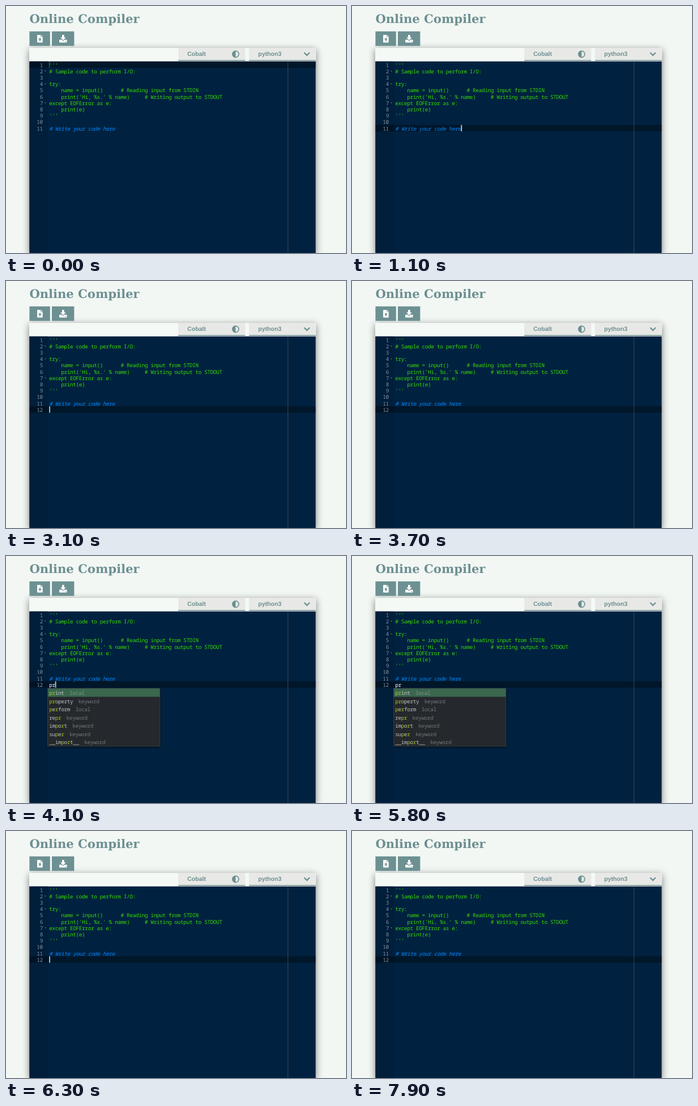
Recreate the animation shown at these times as an HTML page. Size 600x436 px, loop 8000 ms.

```html
<!DOCTYPE html>
<html lang="en">
<head>
<meta charset="utf-8">
<title>Online Compiler</title>
<style>
  html, body { margin: 0; width: 100%; height: 100%; overflow: hidden; background: #f2f7f4; }
  .stage { position: relative; width: 100%; height: 100%; overflow: hidden; contain: strict; }
  .card {
    position: absolute; left: 41px; top: 74px; right: 53px; bottom: 0;
    background: #f4f9f6; box-shadow: 0 3px 12px rgba(0, 0, 0, .48);
  }
  svg { position: absolute; left: 0; top: 0; display: block; width: 100%; height: 100%; overflow: hidden; }
  text { text-rendering: geometricPrecision; white-space: pre; }
  .title { font: bold 21.07px "DejaVu Serif", serif; fill: #6d8f91; }
  .option { font: bold 10.56px "Liberation Sans", sans-serif; fill: #6d8f91; }
  .mono text { font: 9.4px "Noto Sans Mono", monospace; letter-spacing: -.36px; }
  .string { fill: #3ad900; }
  .mono .comment { fill: #08f; font-style: italic; }
  .number { fill: #8091a0; text-anchor: end; }
  .plain { fill: #fff; }
  .item, .meta { fill: #c1c1c1; }
  .meta { fill-opacity: .5; }
  .hit { fill: #9ccd14; }
  .popup { filter: drop-shadow(1.5px 2px 1.7px rgba(0, 0, 0, .5)); }

  .timed { animation: 8s step-end infinite; }
  #active { animation-name: active; }
  #idle { animation-name: idle; }
  #caret { animation-name: move; }
  #blink { animation-name: blink; }
  #line12 { animation-name: line12; }
  #typedP { animation-name: typed-p; }
  #typedR { animation-name: typed-r; }
  #popupPr { animation-name: popup-pr; }
  #popupP { animation-name: popup-p; }

  @keyframes active {
    0% { transform: translateY(0); }
    13.75% { transform: translateY(112.2px); }
    38.75%, 100% { transform: translateY(123.42px); }
  }
  @keyframes idle { 0% { opacity: 1; } 13.75%, 100% { opacity: 0; } }
  @keyframes move {
    0% { transform: translate(116.16px, 112.2px); }
    38.75% { transform: translate(0, 123.42px); }
    51.25% { transform: translate(10.56px, 123.42px); }
    75% { transform: translate(5.28px, 123.42px); }
    78.75%, 100% { transform: translate(0, 123.42px); }
  }
  @keyframes blink {
    0%, 21.25%, 33.75%, 46.25%, 60%, 72.5%, 86.25%, 98.75%, 100% { opacity: 0; }
    13.75%, 26.25%, 38.75%, 51.25%, 65%, 75%, 78.75%, 91.25% { opacity: 1; }
  }
  @keyframes line12 { 0% { opacity: 0; } 38.75%, 100% { opacity: 1; } }
  @keyframes typed-p { 0%, 78.75%, 100% { opacity: 0; } 51.25% { opacity: 1; } }
  @keyframes typed-r { 0%, 75%, 100% { opacity: 0; } 51.25% { opacity: 1; } }
  @keyframes popup-pr { 0%, 76.25%, 100% { opacity: 0; } 51.25% { opacity: 1; } }
  @keyframes popup-p { 0%, 78.75%, 100% { opacity: 0; } 76.25% { opacity: 1; } }
</style>
</head>
<body>
<div class="stage">
<div class="card"></div>
<svg viewBox="0 0 600 436">
  <text class="title" x="41.4" y="29.8">Online Compiler</text>

  <g fill="#6d9092">
    <rect x="41.4" y="44.8" width="36.3" height="25.7"/>
    <rect x="81" y="44.8" width="39.3" height="25.7"/>
  </g>
  <g fill="#fff">
    <path d="M55 51.9q0-.9.9-.9H60.9V54.5H64.7V63.7q0 .8-.9.8H55.9q-.9 0-.9-.8zM61.7 51L64.7 53.8H61.7z"/>
    <path d="M99 51h3.6v4.6h3L100.8 60.4 96 55.6h3z"/>
    <path d="M94 60.3q0-.8.8-.8h3.4l2.6 2.3 2.6-2.3h3.4q.8 0 .8.8v3.3q0 .8-.8.8H94.8q-.8 0-.8-.8z"/>
  </g>
  <path fill="#6d9092" d="M59.9 56l3 3.2h-2.1v2.9h-1.8v-2.9h-2.1zM103.8 62.2h1v1h-1zM105.5 62.2h1v1h-1z"/>

  <g fill="#e8e9e6">
    <rect x="304" y="74" width="118.2" height="23"/>
    <rect x="428.8" y="74" width="117.8" height="23"/>
  </g>
  <path stroke="#6d9092" stroke-width="1.5" d="M304 96.2H422.2M428.8 96.2H546.6"/>
  <text class="option" x="320" y="88.2">Cobalt</text>
  <text class="option" x="445" y="88.2">python3</text>
  <circle cx="405.2" cy="85" r="5.6" fill="none" stroke="#6d8f91" stroke-width="1.6"/>
  <path fill="#6d8f91" d="M405.2 79.4a5.6 5.6 0 0 0 0 11.2z"/>
  <path fill="none" stroke="#6d8f91" stroke-width="2.3" d="M526.2 82.2l4.8 4.8 4.8-4.8"/>

  <rect x="41.4" y="97.8" width="505.2" height="339" fill="#002240"/>
  <rect x="41.4" y="97.8" width="32.6" height="339" fill="#011e3a"/>
  <rect id="active" class="timed" x="41.4" y="97.8" width="505.2" height="11.2" fill="#000" fill-opacity=".35"/>
  <path stroke="#555" stroke-width=".8" d="M497.6 97.8V436"/>

  <g id="code" class="mono"></g>
  <rect id="idle" class="timed" x="76.2" y="97.8" width="1" height="11.2" fill="#35933f"/>
  <g id="caret" class="timed">
    <rect id="blink" class="timed" x="76.3" y="97.8" width="1.4" height="11.2" fill="#fff"/>
  </g>
  <g id="popupPr" class="timed mono popup"></g>
  <g id="popupP" class="timed mono popup"></g>
</svg>
</div>
<script>
  const CHAR = 5.28, LINE = 11.22, ROW = 14.52, LEFT = 76.2, TOP = 97.8;
  const get = id => document.getElementById(id);

  function add(parent, tag, attrs, content = '') {
    const node = document.createElementNS('http://www.w3.org/2000/svg', tag);
    for (const key in attrs) node.setAttribute(key, attrs[key]);
    node.textContent = content;
    return parent.appendChild(node);
  }

  const lines = [
    "'''",
    '# Sample code to perform I/O:',
    '',
    'try:',
    '    name = input()      # Reading input from STDIN',
    "    print('Hi, %s.' % name)     # Writing output to STDOUT",
    'except EOFError as e:',
    '    print(e)',
    "'''",
    '',
    '# Write your code here',
    ''
  ];
  const baseline = i => TOP + i * LINE + 9.7;

  lines.forEach((line, i) => {
    const y = baseline(i), last = i === 11;
    const number = add(get('code'), 'text', { class: 'number' + (last ? ' timed' : ''), x: 64.9, y }, i + 1);
    if (last) number.id = 'line12';
    if (line) add(get('code'), 'text', { class: i === 10 ? 'comment' : 'string', x: LEFT, y }, line);
    if ([1, 3, 6].includes(i)) {
      add(get('code'), 'path', { d: `M67.8 ${y - 4.5}h3.2l-1.6 1.8z`, fill: '#5d7285' });
    }
  });
  add(get('code'), 'text', { id: 'typedP', class: 'plain timed', x: LEFT, y: baseline(11) }, 'p');
  add(get('code'), 'text', { id: 'typedR', class: 'plain timed', x: LEFT + CHAR, y: baseline(11) }, 'r');

  // Each letter of the query is highlighted at its next occurrence in the word.
  function buildPopup(group, query, words) {
    const top = 234, height = words.length * ROW;
    add(group, 'rect', { x: 73.4, y: top - .3, width: 198.4, height: height + .6, fill: '#25282c', stroke: '#484747', 'stroke-width': .7 });
    add(group, 'rect', { x: 73.8, y: top, width: 197.6, height: ROW, fill: '#3a674e' });
    words.forEach((entry, i) => {
      const [word, kind = 'keyword'] = entry.split(' ');
      const y = top + i * ROW + 11;
      const label = add(group, 'text', { class: 'item', x: LEFT, y });
      let next = 0;
      for (const letter of word) {
        const hit = letter === query[next];
        if (hit) next++;
        add(label, 'tspan', hit ? { class: 'hit' } : {}, letter);
      }
      add(group, 'text', { class: 'meta', x: LEFT + word.length * CHAR + 9.3, y }, kind);
    });
    return height;
  }

  buildPopup(get('popupPr'), 'pr',
    ['print local', 'property', 'perform local', 'repr', 'import', 'super', '__import__']);
  const height = buildPopup(get('popupP'), 'p',
    ['print local', 'perform local', 'pass', 'pow', 'print', 'property', 'except local', 'output local']);
  add(get('popupP'), 'rect', { x: 263.5, y: 234, width: 8, height, fill: '#4d5052' });
  add(get('popupP'), 'rect', { x: 265, y: 236, width: 4.6, height: 26.5, rx: 1, fill: '#737678' });
</script>
</body>
</html>
```
